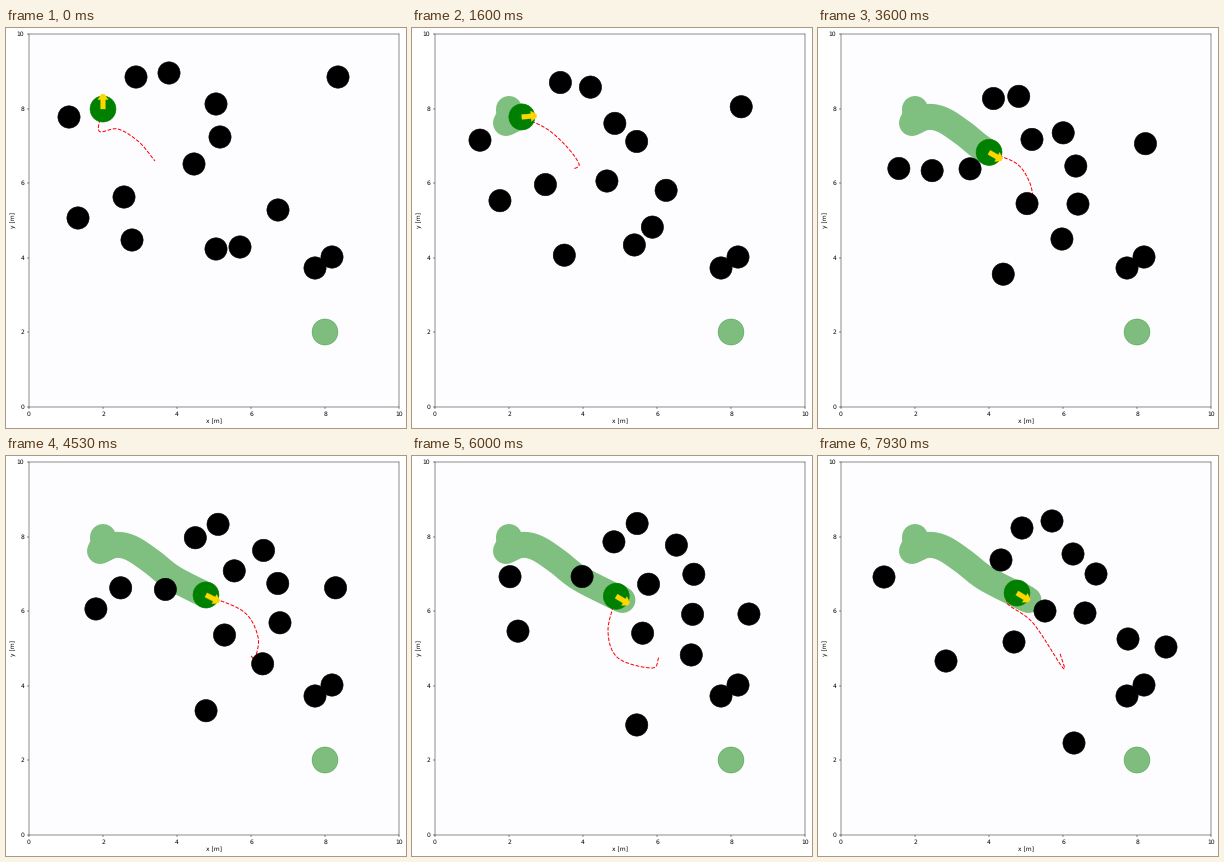
A matplotlib script that plays this animation: 400x400 px, repeating every 8000 ms.

```python
import numpy as np
import matplotlib.pyplot as plt
from matplotlib.animation import FuncAnimation
from matplotlib.patches import Circle, Polygon

FRAMES, INTERVAL = 80, 100
LAST = FRAMES - 1
SIZE, DPI = 400, 40
LEFT, RIGHT, TOP, BOTTOM = 23, 393, 6, 378.5
plt.rcParams.update({"font.size": 10.8, "text.hinting": "none"})


def to_metres(p):
    """Stage pixels to axis units."""
    x, y = np.asarray(p, float).T
    return np.column_stack([10 * (x - LEFT) / (RIGHT - LEFT),
                            10 * (BOTTOM - y) / (BOTTOM - TOP)])


def spline(pts, u):
    """Smooth curve through evenly timed points, u from 0 to 1."""
    pts = np.asarray(pts, float)
    n = len(pts) - 1
    m = np.gradient(pts, axis=0)
    u = np.atleast_1d(u) * n
    i = np.clip(u.astype(int), 0, n - 1)
    s = (u - i)[:, None]
    return ((2 * s**3 - 3 * s**2 + 1) * pts[i] + (s**3 - 2 * s**2 + s) * m[i]
            + (3 * s**2 - 2 * s**3) * pts[i + 1] + (s**3 - s**2) * m[i + 1])


def glide(s, ramp=.13):
    """Steady pace with a short start and stop."""
    def head(s):
        return s * s / (2 * ramp) if s < ramp else s - ramp / 2
    return head(s) / (1 - ramp) if s < .5 else 1 - head(1 - s) / (1 - ramp)


def ease_out(s):
    return 1 - (1 - s)**2


class Leg:
    """One drive along a curve; gear is -1 in reverse."""

    def __init__(self, begin, end, gear, ease, *pts):
        self.begin, self.end, self.gear, self.ease = begin, end, gear, ease
        self.line = to_metres(spline(pts, np.linspace(0, 1, 200)))
        step = np.diff(self.line, axis=0)
        way = np.append(0, np.cumsum(np.hypot(*step.T)))
        self.way = way / way[-1]
        self.angle = np.unwrap(np.arctan2(*(gear * step).T[::-1]))

    def pose(self, k):
        s = self.ease(np.clip((k - self.begin) / (self.end - self.begin), 0, 1))
        x, y = (np.interp(s, self.way, c) for c in self.line.T)
        return x, y, np.interp(s, self.way[1:], self.angle)


LEGS = [
    Leg(0, 7, -1, glide, (97, 81), (97, 88), (94, 95)),
    Leg(8.5, 51, 1, glide, (94, 95), (109, 89), (125, 92), (145, 105),
        (167, 122), (200, 139), (210.5, 144)),
    Leg(51, LAST, -1, ease_out, (210.5, 144), (199, 137)),
]

# Waypoints of each obstacle, evenly spaced over the loop
CROWD = [
    [(309, 240)] * 2,
    [(326, 229)] * 2,
    [(126, 212), (256, 287)],
    [(332, 49), (328, 122), (348, 191)],
    [(118, 169), (155, 138), (183, 104)],
    [(63, 89), (73, 127), (98, 164), (128, 205)],
    [(130, 49), (161, 60), (198, 87), (204, 72)],
    [(163, 45), (189, 66), (220, 68), (234, 65)],
    [(210, 76), (203, 106), (236, 120), (227, 155)],
    [(214, 109), (233, 113), (264, 89), (255, 98)],
    [(210, 221), (232, 214), (268, 204), (310, 183)],
    [(234, 219), (247, 187), (281, 161), (267, 157)],
    [(272, 182), (249, 150), (280, 121), (278, 118)],
    [(188, 136), (197, 157), (212, 178), (231, 177), (196, 186)],
    [(72, 190), (92, 168), (116, 138), (99, 121), (66, 121)],
]

# Route ahead of the robot at a few steps, blended in between
PLANS = {
    0: [(93, 103), (112, 101), (133, 114), (149, 133)],
    16: [(135, 101), (155, 119), (167, 136), (162, 141)],
    27: [(159, 115), (171, 127), (183, 146), (193, 160)],
    45: [(238, 156), (252, 181), (249, 202), (245, 200)],
    60: [(196, 175), (206, 202), (240, 212), (247, 201)],
    72: [(202, 155), (241, 176), (242, 190), (244, 199)],
    LAST: [(189, 147), (215, 167), (245, 212), (242, 197)],
}

ARROW = np.array([(0, -.065), (.25, -.065), (.25, -.14), (.4, -.04),
                  (.4, .04), (.25, .14), (.25, .065), (0, .065)])


def robot_pose(k):
    return [leg for leg in LEGS if leg.begin <= k][-1].pose(k) if k < 7 or k >= 8.5 \
        else LEGS[0].pose(k)


def plan_at(k, start):
    rows = np.array(list(PLANS.values()), float).reshape(len(PLANS), -1)
    pts = [np.interp(k, list(PLANS), c) for c in rows.T]
    pts = np.vstack([start, to_metres(np.reshape(pts, (-1, 2)))])
    return spline(pts, np.linspace(0, 1, 60))


fig = plt.figure(figsize=(SIZE / DPI, SIZE / DPI), dpi=DPI, facecolor="white")
ax = fig.add_axes([LEFT / SIZE, 1 - BOTTOM / SIZE,
                   (RIGHT - LEFT) / SIZE, (BOTTOM - TOP) / SIZE],
                  facecolor="#fdfcfe")
ax.set(xlim=(0, 10), ylim=(0, 10),
       xticks=range(0, 11, 2), yticks=range(0, 11, 2))
ax.tick_params(pad=5)
ax.set_xlabel("x [m]", labelpad=3.5)
ax.set_ylabel("y [m]", labelpad=2)


def disc(radius, color, z, **style):
    return ax.add_patch(Circle((8, 2), radius, color=color, zorder=z, **style))


disc(.35, "green", 1, alpha=.5)
trail, = ax.plot([], [], color="#7fbf7f", lw=26 * 72 / DPI, zorder=1.5,
                 solid_capstyle="round", solid_joinstyle="round")
plan, = ax.plot([], [], "r--", lw=1.8, zorder=2)
robot = disc(.35, "green", 3)
arrow = ax.add_patch(Polygon(ARROW, color="gold", lw=.5, zorder=4))
dots = [disc(.3, "black", 3) for _ in CROWD]


def draw(k):
    for dot, pts in zip(dots, CROWD):
        dot.center = to_metres(spline(pts, k / LAST))[0]
    path = np.array([robot_pose(t)[:2] for t in np.linspace(0, k, 2 * k + 2)])
    trail.set_data(*path.T)
    robot.center = path[-1]
    a = robot_pose(k)[2]
    turn = np.array([(np.cos(a), np.sin(a)), (-np.sin(a), np.cos(a))])
    arrow.set_xy(path[-1] + ARROW @ turn)
    plan.set_data(*plan_at(k, path[-1]).T)
    return [trail, plan, robot, arrow, *dots]


anim = FuncAnimation(fig, draw, frames=FRAMES, interval=INTERVAL,
                     repeat=True, repeat_delay=0, blit=False)
plt.show()
```
